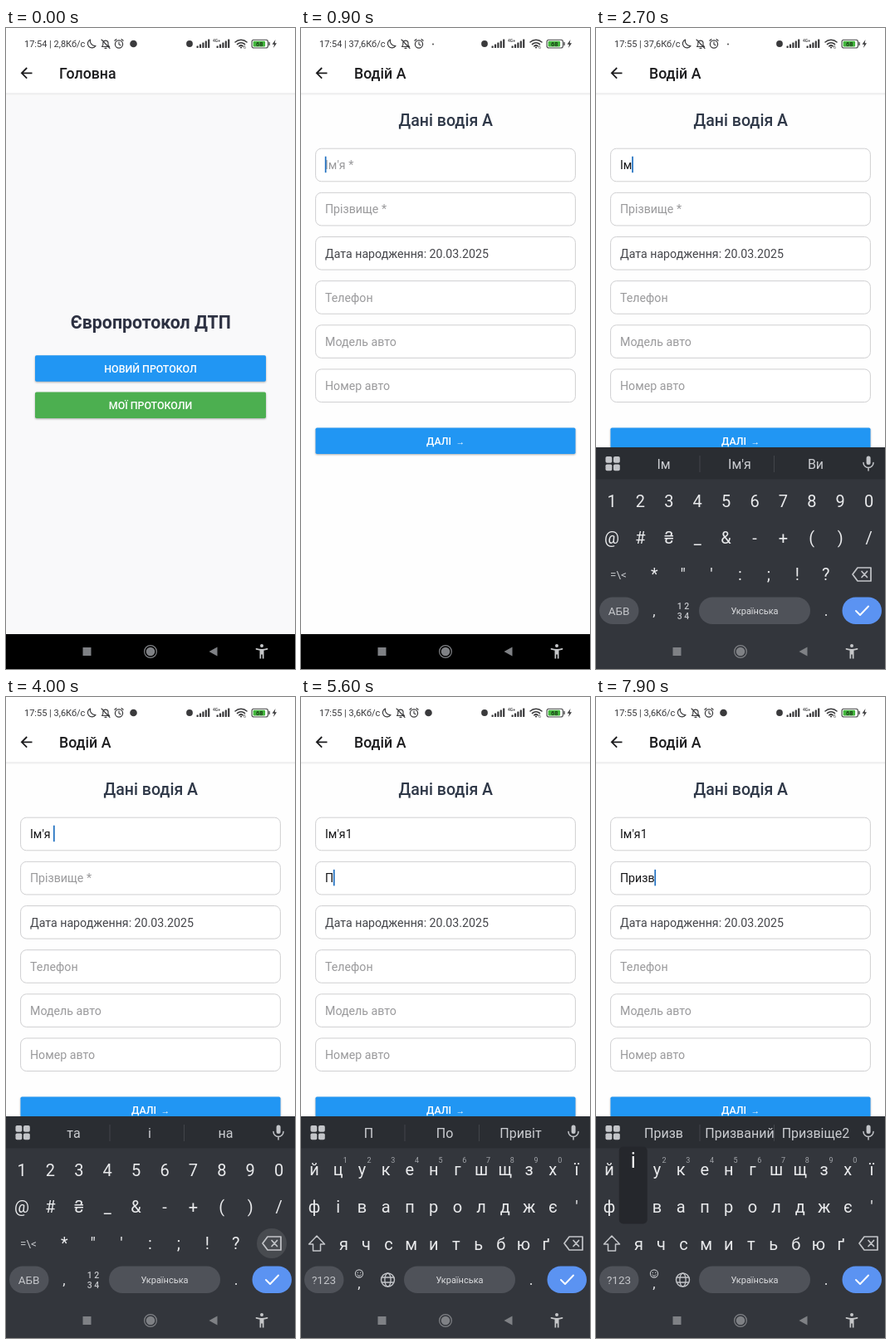
An HTML page for the animation above (8000 ms loop, 348 by 772 pixels).

```html
<!DOCTYPE html>
<html lang="uk">
<head>
<meta charset="utf-8">
<title>Протокол</title>
<style>
html, body { margin: 0; width: 100%; height: 100%; overflow: hidden; background: #fff; }
svg { display: block; width: 348px; height: 772px; font-family: Roboto, "Noto Sans", sans-serif; }
text { white-space: pre; }
.lift { filter: drop-shadow(0 1px 1.3px rgba(0,0,0,.32)); }
.line { fill: none; stroke-linecap: round; stroke-linejoin: round; }
</style>
</head>
<body>
<svg id="stage" viewBox="0 0 348 772" xmlns="http://www.w3.org/2000/svg"></svg>
<script>
const LOOP = 8000, STEP = 100;
const KEYS = '#33363c', STRIP = '#2a2d32', PILL = '#4f5259', INK = '#e9eaec', DIM = '#c3c5c9';

const text = (x, y, s, size, fill, more = '') =>
  `<text x="${x}" y="${y}" font-size="${size}" fill="${fill}" ${more}>${s}</text>`;
const mid = (x, y, s, size, fill, more = '') => text(x, y, s, size, fill, 'text-anchor="middle" ' + more);
const rect = (x, y, w, h, fill, r = 0, more = '') =>
  `<rect x="${x}" y="${y}" width="${w}" height="${h}" rx="${r}" fill="${fill}" ${more}/>`;
const line = (d, color, w = 1.5, more = '') =>
  `<path class="line" d="${d}" stroke="${color}" stroke-width="${w}" ${more}/>`;
const dot = (x, y, r, fill, more = '') => `<circle cx="${x}" cy="${y}" r="${r}" fill="${fill}" ${more}/>`;
const group = (id, body, more = '') => `<g id="${id}" ${more}>${body}</g>`;

// ---------- app screens ----------
const header = title =>
  rect(0, 0, 348, 79, '#fff') + rect(0, 78.5, 348, 1, '#e2e2e3') + rect(0, 79.5, 348, 1, '#f1f1f2') +
  `<path d="M31.5 54.3H19.2M25.2 48L18.9 54.3L25.2 60.6" fill="none" stroke="#1c1c1e" stroke-width="1.8"/>` +
  text(64, 61, title, 17.7, '#1c1c1e', 'font-weight="500"');

const button = (x, y, w, label, fill) =>
  rect(x, y, w, 31.5, fill, 1.8, 'class="lift"') +
  mid(x + w / 2, y + 20.4, label, 12.4, '#fff', 'font-weight="500"');

const home = rect(0, 0, 348, 730, '#f9f9fa') + header('Головна') +
  mid(174.3, 362, 'Європротокол ДТП', 21.3, '#2d3142', 'font-weight="700"') +
  button(35, 394.3, 278, 'НОВИЙ ПРОТОКОЛ', '#2196f3') +
  `<g clip-path="url(#press)">${dot(174, 410, 0, '#fff', 'id="ripple"')}</g>` +
  button(35, 438.5, 278, 'МОЇ ПРОТОКОЛИ', '#4caf50');

const hints = ["Ім'я *", 'Прізвище *', 'Дата народження: 20.03.2025', 'Телефон', 'Модель авто', 'Номер авто'];
const fieldTop = i => 145.2 + i * 53.15;
const form = rect(0, 0, 348, 730, '#fefefe') + header('Водій А') +
  mid(174.3, 117.5, 'Дані водія А', 19.5, '#2f3848', 'font-weight="500"') +
  hints.map((s, i) =>
    rect(17.6, fieldTop(i), 312.8, 39.6, '#fff', 7, 'stroke="#cfcfd1" stroke-width="1"') +
    text(29, fieldTop(i) + 25, s, 14.2, i === 2 ? '#45464b' : '#9a9a9c', `id="field${i}"`)).join('') +
  rect(29, 0, 1.7, 19.5, '#1f6fc0', 0, 'id="caret"') +
  rect(17.5, 481.5, 313, 31.5, '#2196f3', 1.8, 'class="lift"') +
  text(151, 502, 'ДАЛІ', 12.4, '#fff', 'font-weight="500"') +
  text(186.5, 501.5, '→', 10.5, '#fff', 'style="font-family:\'Liberation Sans\',sans-serif"');

// ---------- status bar ----------
const bars = (x, n) => Array.from({ length: n }, (_, i) =>
  rect(x + i * 3.4, 21.5 - i * 2, 2.2, 2.5 + i * 2, '#3a3a3c', .4)).join('');
const S = '#3a3a3c';
const status =
  text(22, 23, '', 11, '#37373a', 'id="clock"') +
  group('tray',
    line('M101.5 14A5.2 5.2 0 1 0 108 21.5A6 6 0 0 1 101.5 14Z', S, 1.2) +
    line('M115.5 22.5H124.5L123 20.5V17.5A3.2 3.2 0 0 0 116.8 17.5V20.5ZM119 24.4H121M115 14L125 24.5', S, 1.1) +
    dot(136, 19.5, 4.6, 'none', `stroke="${S}" stroke-width="1.2"`) +
    line('M136 17V19.7L138 20.8M130.8 15.2L133 13.5M141.2 15.2L139 13.5', S, 1.1) +
    dot(153.5, 19, 4.3, S, 'id="badge"') + dot(153, 19.5, .9, S, 'id="more"')) +
  dot(221, 19, 3.9, S) + bars(229.5, 5) + bars(253.5, 5) +
  text(249, 17, '4G+', 5, S, 'font-weight="500"') +
  line('M276 17A10 10 0 0 1 290 17M278.4 19.6A6.6 6.6 0 0 1 287.6 19.6M280.8 21.9A3.2 3.2 0 0 1 285.2 21.9', S, 1.5) +
  dot(283, 23.5, 1.1, S) + text(286, 25, '6', 5, S) +
  rect(296, 14.2, 19.5, 9.8, '#fff', 2.6, 'stroke="#4a4a4c" stroke-width="1.1"') +
  rect(297.6, 15.8, 14.5, 6.6, '#42b63c', 1.2) + rect(316.4, 17, 1.4, 4.2, '#4a4a4c', .6) +
  mid(305.3, 22, '68', 7.4, '#1f3d1d', 'font-weight="700"') +
  `<path d="M324.5 14L320.5 19.8H323L322 24L326 18.2H323.6Z" fill="${S}"/>`;

// ---------- keyboard ----------
const ROWS = [[...'йцукенгшщзхї'], [..."фівапролджє'"], [...'ячсмитьбюґ']];
const keyX = (r, c) => r < 2 ? 16 + c * 28.73 : 51.5 + c * 27.05;
const rowY = [568.5, 613.5, 658.5];

const erase = x => line(`M${x - 11} 658L${x - 5} 650H${x + 11}V666H${x - 5}ZM${x} 654.5L${x + 6.5} 661.5M${x + 6.5} 654.5L${x} 661.5`, DIM, 1.7);
const pillLabel = s => mid(27.5, 707, s, 13.5, DIM);

const letters = up =>
  ROWS.map((row, r) => row.map((k, c) =>
    mid(keyX(r, c), rowY[r] + 7, up ? k.toUpperCase() : k, 20, INK) +
    (r === 0 && c > 0 && c < 11 ? mid(keyX(r, c) + 8.5, 560.5, c % 10, 9, '#a2a5aa') : '')).join('')).join('') +
  `<path d="M19 649L28.5 659H23.5V667H14.5V659H9.5Z" fill="${up ? '#fff' : 'none'}" stroke="${up ? '#fff' : DIM}" stroke-width="1.5" stroke-linejoin="round"/>` +
  erase(328) + pillLabel('?123') +
  dot(70, 694.5, 4.6, 'none', `stroke="${DIM}" stroke-width="1.1"`) +
  dot(68.3, 693.3, .7, DIM) + dot(71.7, 693.3, .7, DIM) + line('M67.7 695.8A2.6 2.6 0 0 0 72.3 695.8', DIM, 1) +
  mid(70, 711.5, ',', 17, INK) +
  dot(104.5, 702, 8, 'none', `stroke="${DIM}" stroke-width="1.4"`) +
  `<ellipse cx="104.5" cy="702" rx="3.6" ry="8" fill="none" stroke="${DIM}" stroke-width="1.3"/>` +
  line('M97.5 699H111.5M97.5 705H111.5', DIM, 1.3);

const symbols =
  ['1234567890', '@#₴_&-+()/'].map((row, r) => [...row].map((k, c) =>
    mid(19 + c * 34.4, 577 + r * 44.3, k === '&' ? '&amp;' : k, 20, INK)).join('')).join('') +
  mid(27, 662.5, '=\\&lt;', 13.5, DIM) +
  [...'*"\':;!?'].map((k, c) => mid(70.3 + c * 34.4, 665, k, 20, INK)).join('') +
  erase(320) + pillLabel('АБВ') + mid(70, 707.5, ',', 17, INK) +
  mid(105, 700, '1 2', 10.5, DIM, 'font-weight="500"') + mid(105, 711.5, '3 4', 10.5, DIM, 'font-weight="500"');

const tools =
  line('M65.5 517H78.5V526.5L73.5 531.5H65.5ZM73.5 531V526.5H78.5M69.5 525.5A3 3 0 0 0 74 525.5M69.5 521.5H69.6M74.5 521.5H74.6', '#74777c', 1.5) +
  mid(122.5, 528.5, 'GIF', 12, '#74777c', 'font-weight="500" letter-spacing="1"') +
  dot(174, 524, 4.8, 'none', `stroke="${DIM}" stroke-width="4"`) +
  dot(174, 524, 7.2, 'none', `stroke="${DIM}" stroke-width="2.4" stroke-dasharray="3.77"`) +
  line('M218.5 518H231.5V532H218.5ZM222 523H228M222 526H228M222 529H226', DIM, 1.4) + rect(222, 515.5, 6, 4, DIM, 1) +
  `<path d="M276 515.5A8.5 8.5 0 1 0 276 532.5C279 532.5 277 529 278.5 528H281.5C288 527 285 515.5 276 515.5Z" fill="${DIM}"/>` +
  [[271, 524], [273, 519.5], [278.5, 519.5], [281.5, 523.5]].map(p => dot(p[0], p[1], 1.4, STRIP)).join('');

const picks = [81.5, 173, 264.5];
const words = rect(124.5, 515, 1, 20, '#42454a') + rect(214, 515, 1, 20, '#42454a') +
  picks.map((x, i) => mid(x, 530.5, '', 16, '#cbcdd1', `id="word${i}"`)).join('');

const keyboard =
  rect(0, 505, 348, 270, KEYS) + rect(0, 505, 348, 38.5, STRIP) +
  [[11.5, 516], [21, 516], [11.5, 525.5], [21, 525.5]].map(p => rect(p[0], p[1], 7.8, 7.8, DIM, 1.8)).join('') +
  rect(325.6, 515.5, 5, 10.5, DIM, 2.5) + line('M322 523.5A6 6 0 0 0 334 523.5M328 529.5V533', DIM, 1.5) +
  rect(4, 685.5, 47.5, 32.5, PILL, 16.2, 'id="mode"') + rect(124, 685.5, 134, 32.5, PILL, 16.2) +
  mid(191, 706, 'Українська', 11, '#dcdde0') + mid(277, 708, '.', 18, INK) +
  rect(296.5, 685.5, 47.5, 32.5, '#5b93f2', 16.2) + line('M313 702L318 707L328 696.5', '#fff', 1.9) +
  rect(128, 509, 84, 31, '#fff', 4, 'id="tapWord" opacity=".09"') +
  dot(320, 658, 18, '#fff', 'id="tapErase" opacity=".1"') +
  group('upper', letters(true)) + group('lower', letters(false)) + group('symbols', symbols) +
  group('tools', tools) + group('words', words) +
  group('pop', rect(-17, -72, 34, 93, '#25272c', 5) + mid(0, -46.5, '', 25, '#f4f4f5', 'id="popKey"'));

const nav = rect(0, 730, 348, 42, '#000', 0, 'id="navBg"') +
  rect(92.5, 746, 10, 10, '#7f8185') +
  dot(174, 751, 7.4, 'none', 'stroke="#7f8185" stroke-width="1.2"') + dot(174, 751, 5.3, '#7f8185') +
  '<path d="M254.5 745.5V756.5L244.5 751Z" fill="#7f8185"/>' +
  dot(308, 744, 2, '#c6c7c9') +
  line('M301.5 747.8C306 749.2 310 749.2 314.5 747.8', '#c6c7c9', 1.8) +
  '<path d="M305.5 748H310.5V759.5H308.8V754.5H307.2V759.5H305.5Z" fill="#c6c7c9"/>';

const stage = document.getElementById('stage');
stage.innerHTML =
  '<defs><clipPath id="press"><rect x="35" y="394.3" width="278" height="31.5" rx="1.8"/></clipPath></defs>' +
  group('home', home) + group('form', form) + rect(0, 0, 348, 32, '#fff') + status +
  rect(0, 505, 348, 225, '#fff', 0, 'id="cut"') + group('keyboard', keyboard) + group('nav', nav);

const el = {};
stage.querySelectorAll('[id]').forEach(n => el[n.id] = n);

// ---------- script of the session ----------
const start = {
  time: '17:54', rate: '2,8', badge: true, focus: -1, blink: 0,
  a: '', b: '', layout: 'upper', words: null, pop: null, tap: ''
};
const events = [
  [600, { rate: '37,6', badge: false }],
  [900, { focus: 0, blink: 900 }],
  [1900, { pop: [1, 1] }],
  [2000, { a: 'І', pop: null, layout: 'lower', words: ['І', 'Із', 'Її'], blink: 2000 }],
  [2200, { pop: [2, 3] }],
  [2300, { a: 'Ім', pop: null, words: ['Ім', "Ім'я", 'Ви'], blink: 2300 }],
  [2500, { time: '17:55' }],
  [2700, { layout: 'symbols' }],
  [2900, { tap: 'word' }],
  [3000, { a: "Ім'я ", blink: 3000 }],
  [3100, { tap: '', words: ['та', 'і', 'на'] }],
  [4000, { tap: 'erase', rate: '3,6', badge: true }],
  [4100, { a: "Ім'я", words: ["Ім'я", 'Імя', "Ім'ям"], blink: 4100 }],
  [4200, { tap: '' }],
  [4400, { a: "Ім'я1", blink: 4400 }],
  [4500, { words: ["Ім'я1", 'Імя1', "Ім'я 1"] }],
  [4800, { focus: 1, blink: 4800 }],
  [4900, { tap: 'mode' }],
  [5000, { tap: '', layout: 'upper', words: null }],
  [5500, { pop: [1, 4] }],
  [5600, { b: 'П', pop: null, layout: 'lower', words: ['П', 'По', 'Привіт'], blink: 5600 }],
  [5700, { pop: [1, 5] }],
  [5800, { b: 'Пр', pop: null, words: ['Пр', 'Про', 'При'], blink: 5800 }],
  [6000, { pop: [2, 4] }],
  [6100, { b: 'При', pop: null, words: ['При', 'Причому', 'Принципи'], blink: 6100 }],
  [6900, { pop: [0, 9] }],
  [7000, { b: 'Приз', pop: null, words: ['Приз', 'Призер', 'Призов'], blink: 7000 }],
  [7700, { pop: [1, 2] }],
  [7800, { b: 'Призв', pop: null, words: ['Призв', 'Призваний', 'Призвіще2'], blink: 7800 }],
  [7900, { pop: [1, 1] }]
];

const clamp = v => Math.max(0, Math.min(1, v));
const show = (node, on) => node.style.display = on ? '' : 'none';

function fillField(i, value) {
  const f = el['field' + i];
  f.textContent = value || hints[i];
  f.setAttribute('fill', value ? '#161618' : '#9a9a9c');
  return value ? f.getComputedTextLength() : 0;
}

function render(t) {
  const s = Object.assign({}, start);
  for (const [at, change] of events) if (at <= t) Object.assign(s, change);

  // press ripple, then the next screen slides in
  const r = clamp(t / 400);
  el.ripple.setAttribute('r', 170 * r);
  el.ripple.setAttribute('opacity', .28 * (1 - r * .5));
  const p = clamp((t - 200) / 500), ease = 1 - (1 - p) ** 3;
  el.form.setAttribute('opacity', clamp(p * 2));
  el.form.setAttribute('transform', `translate(${35 * (1 - ease)} 0)`);
  el.home.setAttribute('transform', `translate(${-35 * ease} 0)`);

  el.clock.textContent = `${s.time} | ${s.rate}Кб/с`;
  el.tray.setAttribute('transform', `translate(${s.rate.length > 3 ? 6 : 0} 0)`);
  show(el.badge, s.badge);
  show(el.more, !s.badge);

  const widths = [fillField(0, s.a), fillField(1, s.b)];
  show(el.caret, s.focus >= 0 && (t - s.blink) % 1000 < 500);
  if (s.focus >= 0) {
    el.caret.setAttribute('x', 28.8 + widths[s.focus]);
    el.caret.setAttribute('y', fieldTop(s.focus) + 9.5);
  }

  const open = t > 900;
  const drop = 230 * (1 - clamp((t - 900) / 400)) ** 5.5;
  show(el.cut, open);
  show(el.keyboard, open);
  el.keyboard.setAttribute('transform', `translate(0 ${drop})`);
  el.navBg.setAttribute('fill', open ? KEYS : '#000');

  for (const id of ['upper', 'lower', 'symbols']) show(el[id], s.layout === id);
  show(el.tools, !s.words);
  show(el.words, s.words);
  if (s.words) s.words.forEach((w, i) => el['word' + i].textContent = w);
  show(el.tapWord, s.tap === 'word');
  show(el.tapErase, s.tap === 'erase');
  el.mode.setAttribute('fill', s.tap === 'mode' ? '#676a71' : PILL);

  show(el.pop, s.pop);
  if (s.pop) {
    const [row, col] = s.pop, k = ROWS[row][col];
    el.pop.setAttribute('transform', `translate(${keyX(row, col)} ${rowY[row]})`);
    el.popKey.textContent = s.layout === 'upper' ? k.toUpperCase() : k;
  }
}

let origin = null;
function tick(now) {
  if (origin === null) origin = now;
  const t = (now - origin) % LOOP;
  render(Math.floor(t / STEP) * STEP);
  requestAnimationFrame(tick);
}
render(0);
requestAnimationFrame(tick);
</script>
</body>
</html>
```
